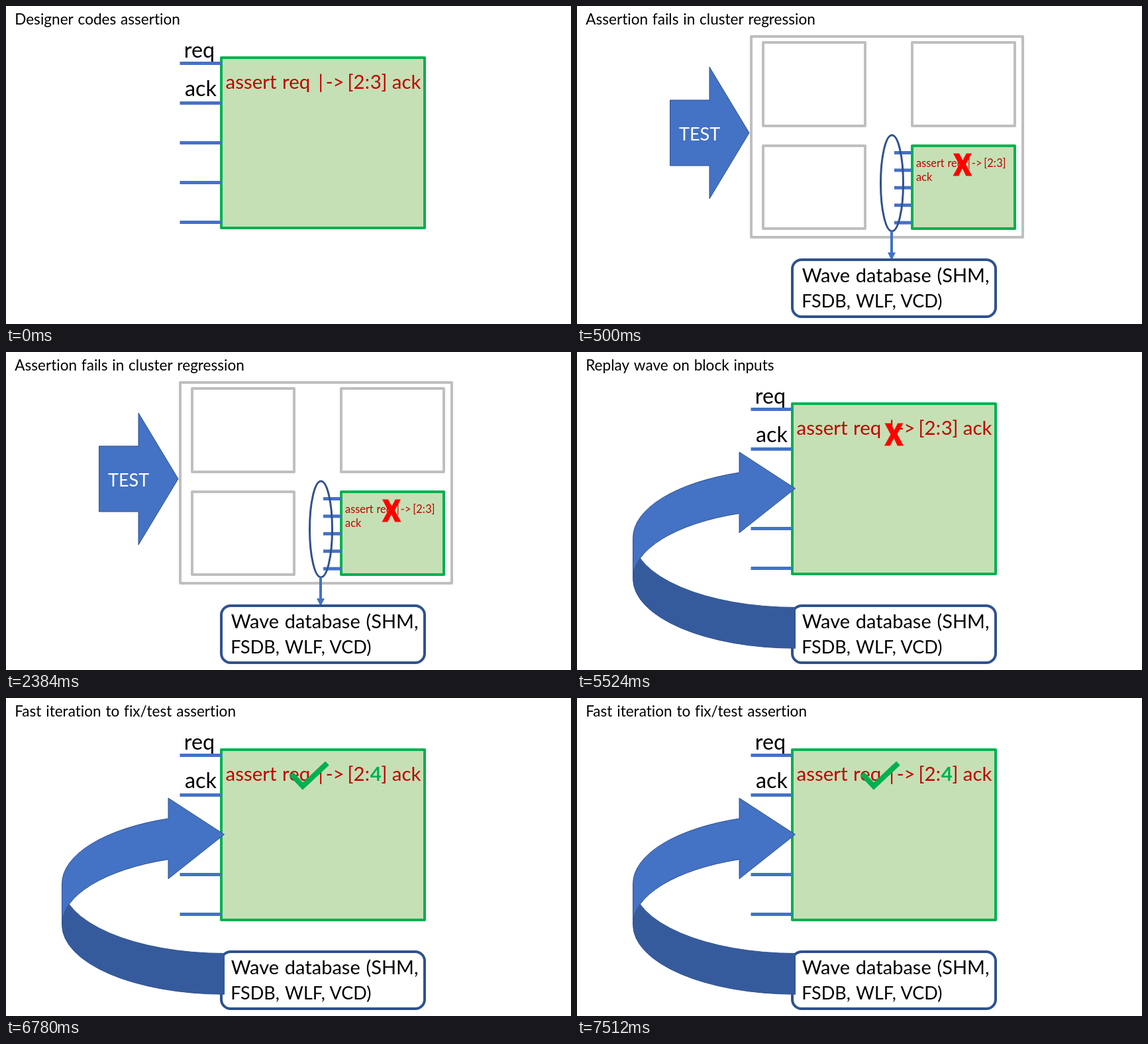
Recreate the animation shown at these times as an HTML page with a canvas. Size 853 px wide and 480 px high, loop 8 s.

```html
<!DOCTYPE html>
<html lang="en">
<head>
<meta charset="utf-8">
<title>Assertion replay</title>
<style>
  html, body { margin: 0; width: 100%; height: 100%; overflow: hidden; background: #fff; }
  canvas { display: block; }
</style>
</head>
<body>
<canvas id="stage" width="853" height="480"></canvas>
<script>
const ctx = document.getElementById('stage').getContext('2d');
const BLUE = '#4472c4', NAVY = '#2f528f', SHADE = '#365b9d', GRAY = '#bfbfbf';
const GREEN = '#00b050', PALE = '#c5e0b4', CRIMSON = '#c00000', RED = '#ff0000';
const LOOP = 8000;

function text(str, x, y, size, color = '#000', weight = 400) {
  ctx.font = `${weight} ${size}px Lato, Carlito, sans-serif`;
  ctx.wordSpacing = `${size * 0.045}px`;
  ctx.letterSpacing = '0.01px'; // any spacing turns ligatures off
  ctx.fillStyle = color;
  ctx.fillText(str, x, y);
}

function paint(path, fill, stroke, width = 1) {
  if (fill) {
    ctx.fillStyle = fill;
    ctx.fill(path);
  }
  if (stroke) {
    ctx.strokeStyle = stroke;
    ctx.lineWidth = width;
    ctx.stroke(path);
  }
}

function polygon(points, closed = true) {
  const path = new Path2D();
  points.forEach(([x, y]) => path.lineTo(x, y));
  if (closed) path.closePath();
  return path;
}

function box(left, top, right, bottom, stroke, fill, radius = 0) {
  const path = new Path2D();
  path.roundRect(left, top, right - left, bottom - top, radius);
  ctx.lineJoin = 'round';
  paint(path, fill, stroke, 4);
  ctx.lineJoin = 'miter';
}

function pins(x1, x2, top, gap) {
  for (let i = 0; i < 5; i++) {
    const y = top + i * gap;
    paint(polygon([[x1, y], [x2, y]], false), null, BLUE, 5);
  }
}

// Offsets are in em; the last word may wrap to its own line.
function assertion(x, y, em, limit, wrapY) {
  const put = (str, offset, color = CRIMSON, weight = 400) =>
    text(str, x + offset * em, y, em * 0.92, color, weight);
  put('assert', 0);
  put('req', 2.669);
  put('|', 4.37);
  put('->', 4.72);
  put('[2:', 5.75);
  put(limit, 6.82, limit === '4' ? GREEN : CRIMSON, limit === '4' ? 700 : 400);
  put(']', 7.34);
  if (wrapY) text('ack', x, wrapY, em * 0.92, CRIMSON);
  else put('ack', 7.85);
}

function cross(x, y) {
  const shape = [[0, 0], [9, 0], [14.3, 10.5], [19.8, 0], [28, 0], [19, 16.5],
    [28.5, 34], [19.3, 34], [13.8, 22.5], [8.2, 34], [-0.5, 34], [9, 17]];
  paint(polygon(shape.map(([dx, dy]) => [x + dx, y + dy])), RED);
}

function tick() {
  paint(polygon([[430.5, 114.5], [448, 133], [485, 98.5]], false), null, GREEN, 8);
}

function title(str) {
  text(str, 13.2, 28, 22.55);
}

function block(limit) {
  box(325, 78, 632, 335, GREEN, PALE);
  pins(262.5, 325, 86.5, 60);
  text('req', 268.8, 78, 32.3);
  text('ack', 270, 136, 32.3);
  assertion(331.6, 124.5, 32, limit);
}

function database() {
  box(325, 383, 632, 469, NAVY, '#fff', 14);
  text('Wave database (SHM,', 339.7, 416.5, 29);
  text('FSDB,', 339.2, 454.5, 27);
  text('WLF,', 421, 454.5, 27);
  text('VCD)', 488.5, 454.5, 27);
}

function replayArrow() {
  const cx = 329.5, rx = 245, ry = 105, upper = 280.5, lower = 342.2;
  const neck = Math.PI + Math.acos(84.5 / rx);

  const tail = new Path2D();
  tail.ellipse(cx, lower, rx, ry, 0, Math.PI, Math.PI / 2, true);
  tail.ellipse(cx, upper, rx, ry, 0, Math.PI / 2, Math.PI);
  tail.closePath();
  paint(tail, SHADE, NAVY);

  const head = new Path2D();
  head.ellipse(cx, upper, rx, ry, 0, Math.PI, neck);
  [[245, 151], [329.5, 206], [245, 273]].forEach(([x, y]) => head.lineTo(x, y));
  head.ellipse(cx, lower, rx, ry, 0, neck, Math.PI, true);
  head.closePath();
  paint(head, BLUE, NAVY);
}

function codeScene() {
  title('Designer codes assertion');
  block('3');
}

function clusterScene() {
  title('Assertion fails in cluster regression');
  box(263, 46, 673, 349, GRAY);
  box(281, 55, 435, 181, GRAY);
  box(506, 55, 661, 181, GRAY);
  box(281, 211, 435, 336, GRAY);
  box(506, 211, 661, 336, GREEN, PALE);
  pins(479, 506, 221.5, 26.4);
  assertion(512, 242.5, 17.77, '3', 263.5);
  cross(568, 222.5);

  paint(polygon([[140.5, 142], [200, 142], [200, 92], [260, 191.5],
    [200, 291], [200, 241], [140.5, 241]]), BLUE, NAVY);
  text('TEST', 154, 202.5, 27, '#fff');

  const ring = new Path2D();
  ring.ellipse(475.5, 267.5, 17, 72.5, 0, 0, Math.PI * 2);
  paint(ring, null, NAVY, 3);
  paint(polygon([[475, 340], [475, 374]], false), null, BLUE, 4);
  paint(polygon([[469, 372], [481, 372], [475, 384]]), BLUE);
  database();
}

function replayScene(caption, limit, mark) {
  title(caption);
  block(limit);
  database();
  replayArrow();
  mark();
}

const scenes = [
  { until: 500, draw: codeScene },
  { until: 3640, draw: clusterScene },
  { until: 6780, draw: () => replayScene('Replay wave on block inputs', '3', () => cross(464.5, 107.5)) },
  { until: LOOP, draw: () => replayScene('Fast iteration to fix/test assertion', '4', tick) }
];

const start = performance.now();

function render() {
  const time = Math.max(0, performance.now() - start) % LOOP;
  ctx.fillStyle = '#fff';
  ctx.fillRect(0, 0, 853, 480);
  scenes.find(scene => time < scene.until).draw();
  requestAnimationFrame(render);
}

render();
</script>
</body>
</html>
```
